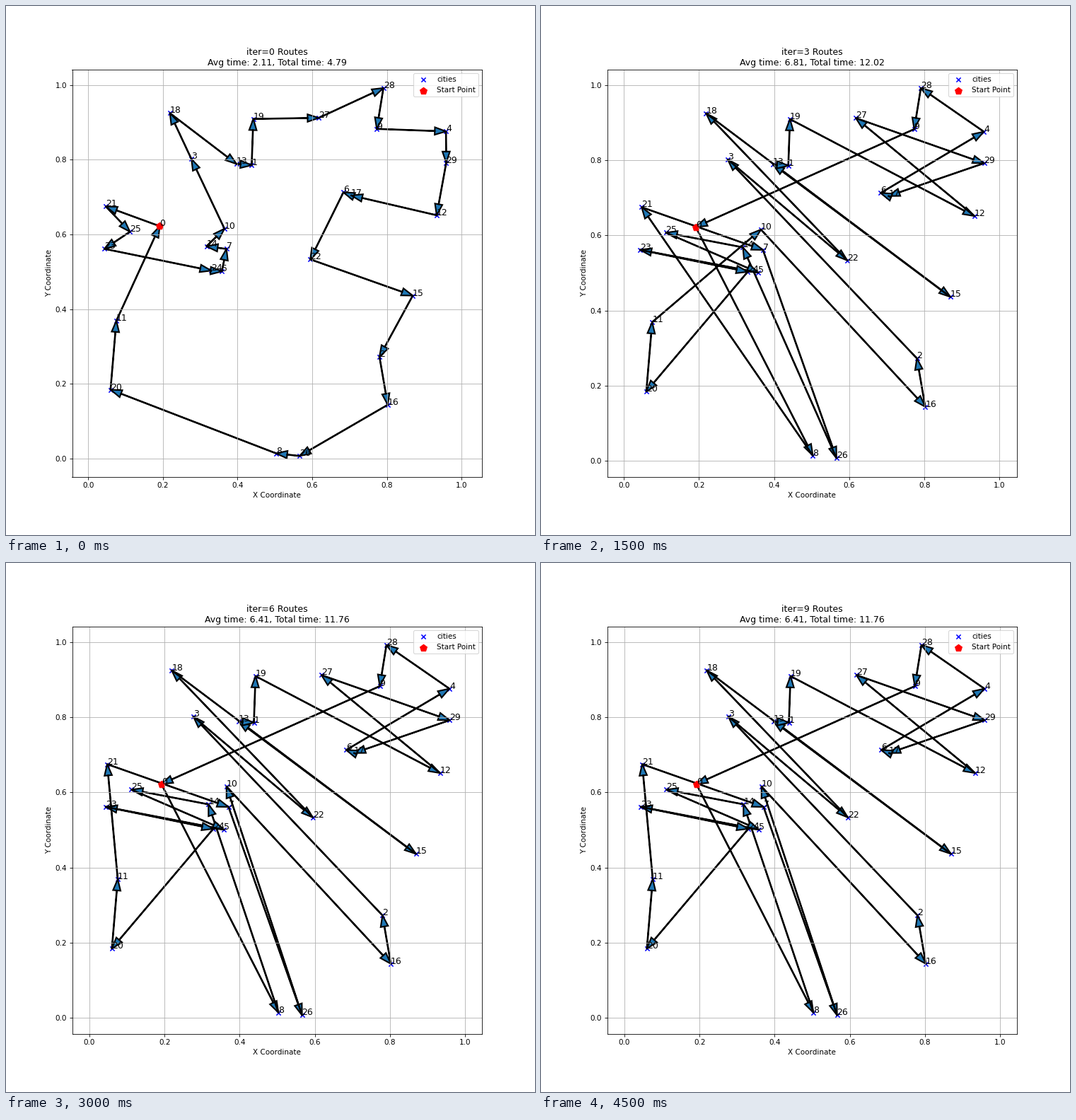
Recreate the animation shown at these times as a matplotlib script. Size 748 px wide and 748 px high, loop 5000 ms.

```python
import matplotlib.pyplot as plt
import numpy as np
from matplotlib.animation import FuncAnimation

cities = np.random.RandomState(1234).rand(30, 2)

FIRST_ROUTE = [0, 21, 25, 23, 24, 5, 7, 14, 10, 3, 18, 13, 1, 19, 27,
               28, 9, 4, 29, 12, 17, 6, 22, 15, 2, 16, 26, 8, 20, 11]

# Per iteration: (anchor, cities moved to just behind it)
MOVES = {
    1: [(5, 14), (9, 6, 17), (12, 15)],
    2: [(21, 7, 14), (5, 20, 11, 8, 26), (10, 16, 2), (3, 22), (18, 15),
        (19, 12, 29, 17, 6, 4, 9, 28, 27)],
    3: [(0, 8), (7, 26), (25, 5), (12, 27), (4, 28)],
    5: [(11, 21, 7, 26)],
}


def move(route, anchor, *group):
    rest = [c for c in route if c not in group]
    cut = rest.index(anchor) + 1
    return rest[:cut] + list(group) + rest[cut:]


def route_at(i):
    route = FIRST_ROUTE
    for step in range(1, i + 1):
        for m in MOVES.get(step, []):
            route = move(route, *m)
    return route


fig, ax = plt.subplots(figsize=(10, 10), dpi=74.8)


def draw(i):
    path = cities[route_at(i) + [0]]
    legs = np.diff(path, axis=0)
    arrivals = np.cumsum(np.hypot(*legs.T))

    ax.clear()
    ax.scatter(*cities.T, marker="x", c="blue", label="cities")
    for (x, y), (dx, dy) in zip(path, legs):
        ax.arrow(x, y, dx, dy, head_width=0.02, head_length=0.03,
                 linewidth=2, length_includes_head=True)
    ax.scatter(*cities[0], marker="p", c="red", s=100, label="Start Point")
    for n, (x, y) in enumerate(cities):
        ax.text(x, y, str(n), fontsize=12)

    ax.set_title(f"iter={i} Routes\nAvg time: {arrivals.mean():.2f}, "
                 f"Total time: {arrivals[-1]:.2f}")
    ax.set_xlabel("X Coordinate")
    ax.set_ylabel("Y Coordinate")
    ax.legend(loc="upper right")
    ax.grid(True)
    ax.axis("equal")
    return []


anim = FuncAnimation(fig, draw, frames=10, interval=500, repeat=True)
plt.show()
```
